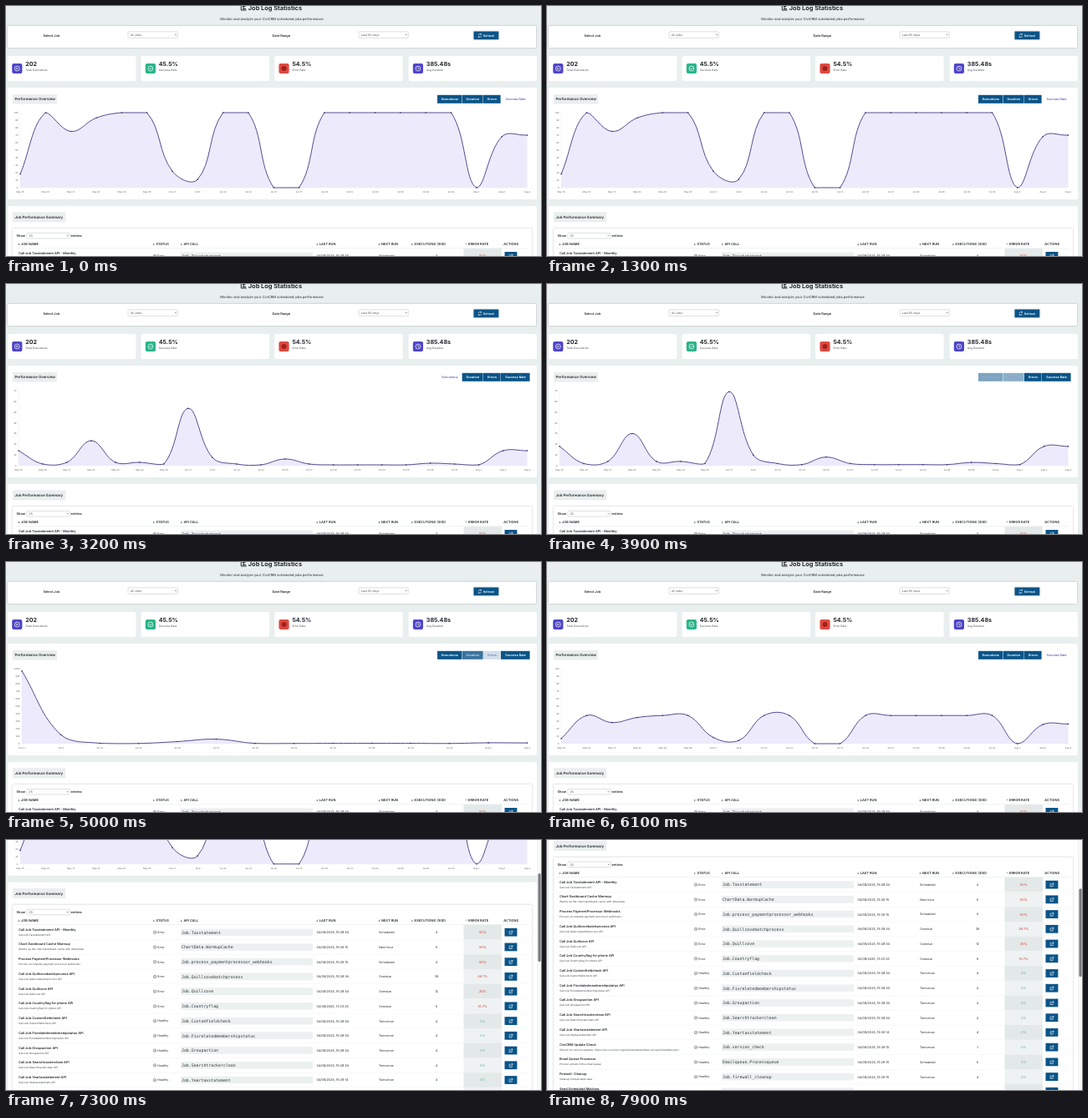
These frames come from a looping animation (640x300 px, 8 s). An HTML page:

```html
<!DOCTYPE html>
<html lang="en">
<head>
<meta charset="utf-8">
<title>Job Log Statistics</title>
<style>
  html, body { margin: 0; width: 100%; height: 100%; overflow: hidden; background: #e9efef; }
  svg { display: block; width: 640px; height: 300px; }
  text { font-family: Inter, sans-serif; fill: #23282d; text-rendering: geometricPrecision; }
  .mono { font-family: "DejaVu Sans Mono", monospace; fill: #33383d; }
  .axis { font-family: "Liberation Sans", Arial, sans-serif; fill: #666; }
  .b { font-weight: 700; }
  .sb { font-weight: 600; }
  .soft { filter: drop-shadow(0 .6px 1.3px rgba(0, 0, 0, .25)); }
</style>
</head>
<body>
<svg viewBox="0 0 640 300">
  <g id="page">
    <g id="static"></g>
    <g id="tabs"></g>
    <g id="axes"></g>
    <path id="area" fill="#edeafb"/>
    <path id="line" fill="none" stroke="#403a86" stroke-width=".9"/>
    <path id="dots" fill="none" stroke="#322c70" stroke-width="1.6" stroke-linecap="round"/>
  </g>
  <g id="bar">
    <rect x="635.5" width="4.5" height="300" fill="#f7f8f8"/>
    <rect id="thumb" x="636.5" width="3.2" height="106" rx="1.6" fill="#777a7c"/>
  </g>
</svg>
<script>
const $ = id => document.getElementById(id);
const BLUE = '#0a5488';

// Markup helpers; text is centred vertically on cy.
const text = (x, cy, s, size, cls = '', attrs = '') =>
  `<text x="${x}" y="${(cy + size * .36).toFixed(2)}" font-size="${size}" class="${cls}" ${attrs}>${s}</text>`;
const rect = (x, y, x2, y2, fill, attrs = '') =>
  `<rect x="${x}" y="${y}" width="${x2 - x}" height="${y2 - y}" fill="${fill}" ${attrs}/>`;
const stroke = (d, color, w = .6, attrs = '') =>
  `<path d="${d}" fill="none" stroke="${color}" stroke-width="${w}" ${attrs}/>`;
const circle = (x, y, r, color, w = .8) =>
  `<circle cx="${x}" cy="${y}" r="${r}" fill="none" stroke="${color}" stroke-width="${w}"/>`;
const select = (x, y, x2, y2, s) =>
  rect(x, y, x2, y2, '#fff', 'rx="1" stroke="#b9bec2" stroke-width=".5"') +
  text(x + 2.7, (y + y2) / 2, s, 3.6, '', 'fill-opacity=".75"') +
  stroke(`M${x2 - 3.6} ${(y + y2) / 2 - .5}l1 1l1 -1`, '#333', .5);
const middle = 'text-anchor="middle"';

function header() {
  return stroke('M281.3 -1V5H287.6M283 .4h3.4M283 1.9h2.2M283 3.4h4', '#23282d', 1) +
    text(289.8, 2.8, 'Job Log Statistics', 7.4, 'b') +
    text(318, 15.6, 'Monitor and analyze your CiviCRM scheduled jobs performance', 4.1, '', middle) +
    rect(2, 24, 634, 50, '#fff', 'class="soft"') +
    text(44.5, 35.4, 'Select Job', 3.9, 'sb') + select(146, 30.8, 205.5, 38.3, 'All Jobs') +
    text(318.5, 35.4, 'Date Range', 3.9, 'sb') + select(422, 30.8, 481.3, 38.3, 'Last 90 days') +
    rect(559.5, 30.5, 589.3, 40.2, BLUE, 'class="soft"') +
    stroke('M565.2 35a1.7 1.7 0 0 1 3 -1M568.5 35.8a1.7 1.7 0 0 1 -3 1M568.5 32.9v1.3h-1.3M565.1 37.9v-1.3h1.3', '#fff', .6) +
    text(571, 35.4, 'Refresh', 3.5, 'sb', 'style="fill:#fff"');
}

function cards() {
  const list = [
    [2, '202', 'Total Executions', '#4f46c6', (x, y) => `<path d="M${x - .8} ${y - 1.2}l2 1.2l-2 1.2z" fill="#fff"/>`],
    [161.6, '45.5%', 'Success Rate', '#2ab489', (x, y) => stroke(`M${x - 1.3} ${y}l1 1l1.7 -1.9`, '#fff', .7)],
    [321.2, '54.5%', 'Error Rate', '#dc4a40', null],
    [481.6, '385.48s', 'Avg Duration', '#4f46c6', (x, y) => stroke(`M${x} ${y - 1.8}v1.9l1.2 .8`, '#fff', .7)]
  ];
  return list.map(([x, value, label, color, glyph]) => {
    const cx = x + 11.3, cy = 75;
    return rect(x, 60, x + 153.4, 90, '#fff', 'rx="2"') +
      rect(x + 5.2, 69, x + 17.4, 81, color, 'rx="2"') +
      (glyph ? circle(cx, cy, 2.9, '#fff', .7) + glyph(cx, cy)
             : `<circle cx="${cx}" cy="${cy}" r="3" fill="#a3211c"/>`) +
      text(x + 21.2, 69.3, value, 7.1, 'b') + text(x + 21.2, 76.5, label, 3.4, '', 'fill-opacity=".8"');
  }).join('');
}

function panels() {
  return rect(2, 98, 635, 232, '#fff', 'rx="2"') +
    rect(8, 106, 61, 117.6, '#ebeeee') + text(10.5, 111.8, 'Performance Overview', 4.35, 'sb') +
    rect(2, 240, 635, 640, '#fff', 'rx="2"') +
    rect(8, 247.3, 71.3, 259.3, '#ebeeee') + text(10.5, 253.4, 'Job Performance Summary', 4.35, 'sb') +
    rect(8, 267, 629, 630, '#fff', 'class="soft"') +
    text(12.5, 275.7, 'Show', 3.9, 'sb') + select(24.8, 272.4, 76.3, 279, '25') +
    text(77.6, 275.7, 'entries', 3.9, 'sb');
}

// name | description | call | last run | next run | executions | error rate; "*" repeats the plain call name
const jobs = `Call Job.Taxstatement API - Monthly|*|Job.Taxstatement|19:28:54|Scheduled|4|50%
Chart Dashboard Cache Warmup|Warms up the chart dashboard cache with initial data|ChartData.WarmupCache|19:29:15|Next hour|6|50%
Process PaymentProcessor Webhooks|Process incomplete payment processor webhooks|Job.process_paymentprocessor_webhooks|19:29:15|Scheduled|4|50%
*|*|Job.Quillcovebatchprocess|19:28:54|Overdue|39|48.7%
*|*|Job.Quillcove|19:28:54|Overdue|12|25%
Call Job.Countryflag for phone API|Call Job.Countryflag for phone API|Job.Countryflag|13:23:25|Overdue|6|16.7%
*|*|Job.Customfieldcheck|19:28:54|Tomorrow|4|0%
*|*|Job.Fixrelatedmembershipstatus|19:28:54|Tomorrow|4|0%
*|*|Job.Groupaction|19:28:54|Tomorrow|4|0%
*|*|Job.Searchtrackerclean|19:28:54|Tomorrow|4|0%
*|*|Job.Yeartaxstatement|19:29:14|Tomorrow|4|0%
CiviCRM Update Check|Checks for version updates. https://docs.civicrm.org/user/en/latest/initial-set-up/scheduled-jobs/|Job.version_check|19:29:15|Tomorrow|1|0%
Email Queue Processor|Process emails in the email queue|Emailqueue.Processqueue|19:29:15|Scheduled|6|0%
Firewall: Cleanup|Cleanup firewall table data|Job.firewall_cleanup|19:29:15|Tomorrow|4|0%
Send Scheduled Mailings|Sends out scheduled mailings|Job.process_mailing|19:29:15|Scheduled|4|0%`.split('\n');

function table() {
  const heads = [[18, 'JOB NAME'], [179.4, 'STATUS'], [212.4, 'API CALL'], [374.8, 'LAST RUN'],
    [449, 'NEXT RUN'], [488.5, 'EXECUTIONS (30D)'], [553, 'ERROR RATE'], [595.3, 'ACTIONS']];
  let out = heads.map(([x, s], i) => text(x, 286, s, 3.95, 'sb') + (i === 7 ? '' :
    `<path d="M${x - 3.4} 285.8l.8 -1.1l.8 1.1z${i === 6 ? '' : `M${x - 3.4} 286.3l.8 1.1l.8 -1.1z`}" fill="#444"/>`)).join('');
  out += rect(12, 290.7, 625, 291.1, '#d9dddd');
  jobs.forEach((row, i) => {
    const [name, note, call, time, next, runs, rate] = row.split('|');
    const y = 291.1 + 17.73 * i, c = y + 8.9, plain = `Call ${call} API`, bad = rate !== '0%';
    const day = call === 'Job.Countryflag' ? '02' : '04';
    out += rect(547.5, y, 593, y + 17.73, i % 2 ? '#eff2f2' : '#e3e9e8') +
      rect(12, y + 17.5, 625, y + 17.8, '#e6e9e9') +
      text(15, y + 5.4, name === '*' ? plain : name, 3.9, 'sb') +
      text(15, y + 11.7, note === '*' ? plain : note, 3.1, '', 'fill-opacity=".85"') +
      circle(178, c, 1.7, '#444', .5) +
      stroke(bad ? `M178 ${c - 1}v1.1M178 ${c + .5}v.5` : `M177.2 ${c}l.6 .6l1 -1.1`, '#444', .5) +
      text(181.3, c, bad ? 'Error' : 'Healthy', 3.6) +
      rect(209, c - 4.4, 367, c + 4.2, '#edf0f0', 'rx=".8"') +
      text(210, c, call, 4.89, 'mono') +
      text(371.4, c, `${day}/08/2025, ${time}`, 3.75) +
      text(446, c, next, 3.7) +
      text(515, c, runs, 3.7, '', middle) +
      text(570.2, c, rate, 3.9, '', `${middle} style="fill:${bad ? '#d83a35' : '#5cb592'}"`) +
      rect(596.5, c - 5, 611.4, c + 4.8, BLUE) +
      stroke(`M603.6 ${c - 1.2}h-1.5v3.2h3.2v-1.5M604.3 ${c - 1.7}h1.7v1.7M606 ${c - 1.7}l-2.3 2.3`, '#fff', .6);
  });
  return out;
}

$('static').innerHTML = header() + cards() + panels() + table();

// Chart views
const days = 'May 15,May 16,May 17,May 21,May 23,May 24,May 26,Jun 17,Jul 9,Jul 13,Jul 14,Jul 15,Jul 17,Jul 18,Jul 21,Jul 23,Jul 28,Jul 29,Jul 31,Aug 1,Aug 2,Aug 4'.split(',');
const views = [
  { name: 'Executions', left: 15, max: 70, step: 10, days,
    data: [18, 2, 4, 30, 4, 4, 2, 69, 10, 2, 1, 8, 2, 1, 1, 1, 1, 3, 2, 1, 18, 18] },
  { name: 'Duration', left: 19, max: 1000, step: 100,
    days: days.filter((d, i) => i > 6 && d !== 'Aug 1'),
    data: [970, 120, 6, 3, 28, 60, 4, 3, 5, 5, 5, 3, 12, 10] },
  { name: 'Errors', left: 15, max: 60, step: 10, days,
    data: [14, 0, 1, 2, 0, 0, 2, 54, 9, 0, 0, 8, 2, 0, 0, 0, 0, 0, 0, 1, 6, 5] },
  { name: 'Success Rate', left: 17, max: 100, step: 10, days: days.filter(d => d !== 'May 24'),
    data: [18, 100, 75, 93, 100, 100, 22, 11, 100, 100, 0, 0, 100, 100, 100, 100, 100, 100, 0, 68, 70] }
];
const TOP = 128, BASE = 218, RIGHT = 623.5;
const edges = [516, 545.6, 571, 592, 627];

$('tabs').innerHTML = rect(516, 106.8, 627, 117, '#fff') + views.map((v, i) =>
  rect(edges[i], 106.8, edges[i + 1] - .4, 116.8, BLUE) +
  text((edges[i] + edges[i + 1]) / 2, 111.8, v.name, 3.75, '', middle)).join('');
const tabBoxes = [...$('tabs').querySelectorAll('rect')].slice(1);
const tabTexts = [...$('tabs').querySelectorAll('text')];

const clamp = (v, a, b) => Math.min(b, Math.max(a, v));
const mix = (a, b, p) => `rgb(${a.map((v, i) => Math.round(v + (b[i] - v) * p))})`;

function drawAxes(v) {
  let out = stroke(`M${v.left} ${TOP}V${BASE}H${RIGHT}`, '#e3e4e6', .4);
  for (let n = 0; n <= v.max; n += v.step)
    out += text(v.left - 2.6, BASE - (BASE - TOP) * n / v.max, n.toLocaleString('en-US'), 2.9, 'axis', 'text-anchor="end"');
  v.days.forEach((d, i) => {
    out += text(v.left + (RIGHT - v.left) * i / (v.days.length - 1), 222.8, d, 2.9, 'axis', middle);
  });
  $('axes').innerHTML = out;
}

// Tension spline whose control points stay inside the plot.
function drawCurve(v, grow) {
  const n = v.data.length, tension = .4;
  const pts = v.data.map((d, i) => [v.left + (RIGHT - v.left) * i / (n - 1), BASE - (BASE - TOP) * d / v.max * grow]);
  const ctrl = pts.map((p, i) => {
    const a = pts[Math.max(0, i - 1)], b = pts[Math.min(n - 1, i + 1)];
    const d1 = Math.hypot(p[0] - a[0], p[1] - a[1]), d2 = Math.hypot(b[0] - p[0], b[1] - p[1]);
    const at = k => [clamp(p[0] + k * (b[0] - a[0]), v.left, RIGHT), clamp(p[1] + k * (b[1] - a[1]), TOP, BASE)];
    return [at(-tension * d1 / (d1 + d2)), at(tension * d2 / (d1 + d2))];
  });
  const f = p => p.map(c => c.toFixed(2)).join(' ');
  let d = 'M' + f(pts[0]);
  for (let i = 1; i < n; i++) d += `C${f(ctrl[i - 1][1])} ${f(ctrl[i][0])} ${f(pts[i])}`;
  $('line').setAttribute('d', d);
  $('area').setAttribute('d', `${d}V${BASE}H${v.left}Z`);
  $('dots').setAttribute('d', pts.map(p => `M${f(p)}h.01`).join(''));
}

// Timeline
const LOOP = 8000, FADE = 300, LAG = 190, GROW = 1000, SCROLL = 6742;
const clicks = [[-9000, 3], [2700, 0], [3820, 1], [4850, 2], [5800, 3]];
let shown = -1;

function render(t) {
  const k = clicks.findLastIndex(c => t >= c[0]);
  const on = 1 - (1 - clamp((t - clicks[k][0]) / FADE, 0, 1)) ** 2.4;
  views.forEach((v, i) => {
    const p = i === clicks[k][1] ? on : k && i === clicks[k - 1][1] ? 1 - on : 0;
    tabBoxes[i].setAttribute('fill', mix([10, 84, 136], [255, 255, 255], p));
    tabTexts[i].style.fill = mix([255, 255, 255], [62, 58, 160], p);
    tabTexts[i].style.fontWeight = p > .5 ? 400 : 600;
  });

  const c = clicks.findLastIndex(c => t >= c[0] + LAG), view = clicks[c][1];
  if (view !== shown) drawAxes(views[shown = view]);
  const q = clamp((t - clicks[c][0] - LAG) / GROW, 0, 1);
  drawCurve(views[view], 1 - (1 - q) ** 4);

  const s = t < SCROLL ? 0 : 267 * (1 - Math.exp(-.002206 * (t - SCROLL)));
  $('page').setAttribute('transform', `translate(0 ${-s.toFixed(2)})`);
  $('bar').style.display = s ? '' : 'none';
  $('thumb').setAttribute('y', -19.7 + .316 * s);
}

const start = performance.now();
function tick() {
  render((performance.now() - start) % LOOP);
  requestAnimationFrame(tick);
}
tick();
</script>
</body>
</html>
```
